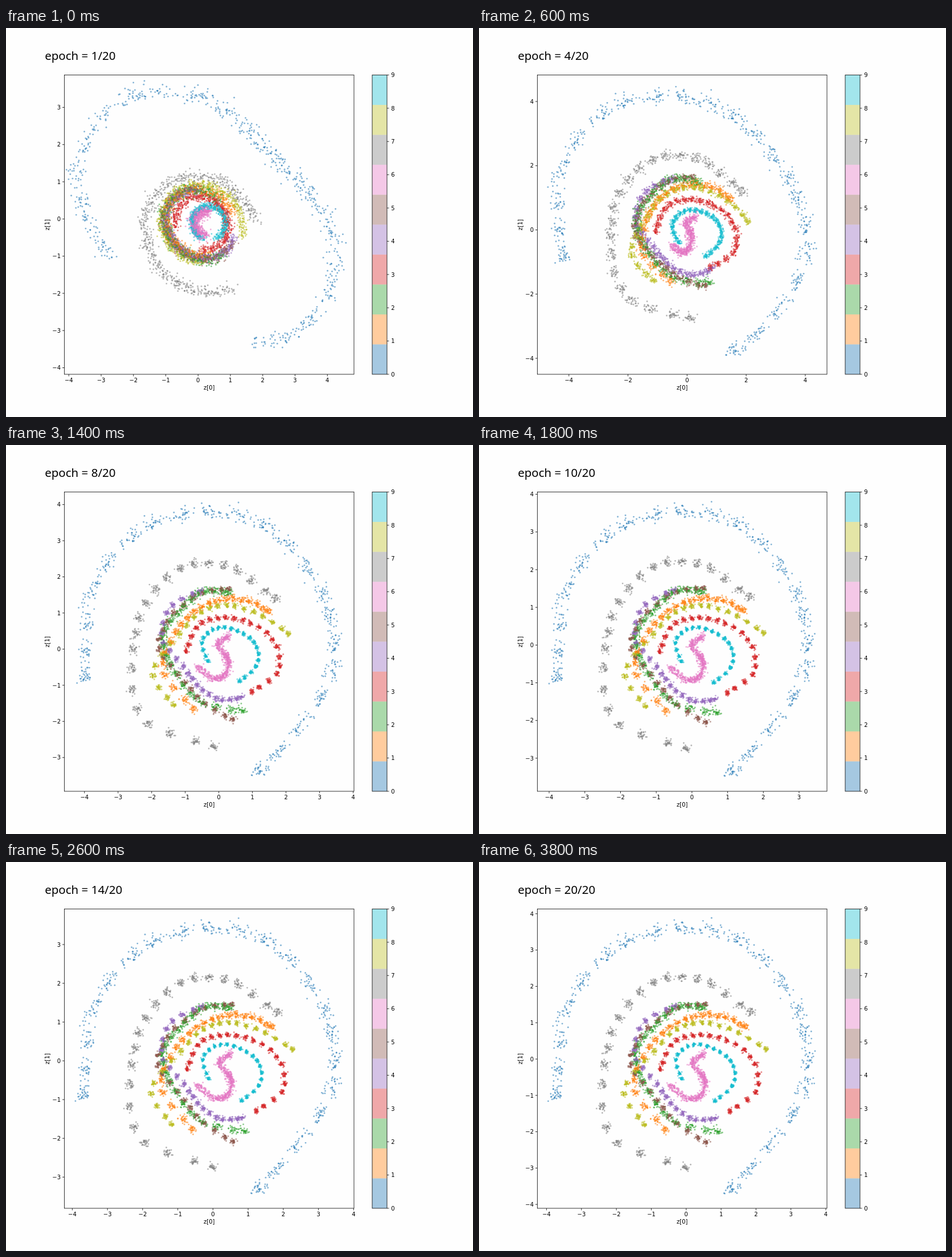
These frames come from a looping animation (820x683 px, 4000 ms). An HTML page with a canvas:

```html
<!DOCTYPE html>
<html lang="en">
<head>
<meta charset="utf-8">
<title>Latent space by epoch</title>
<style>
html, body { margin: 0; width: 100%; height: 100%; overflow: hidden; background: #fefefe; }
canvas { display: block; width: 820px; height: 683px; }
</style>
</head>
<body>
<canvas id="stage" width="820" height="683"></canvas>
<script>
const ctx = document.getElementById('stage').getContext('2d');
const EPOCHS = 20, STEP_MS = 200, CLUSTERS = 21, PER_CLUSTER = 32;
const BOX = { l: 102.5, t: 82.5, r: 611, b: 608 };

// epoch, x of zero, px per x unit, y of zero, px per y unit
const AXES = [
  [1, 337.3, 56.75, 335.3, 65.3],
  [3, 361.3, 50.2, 349, 54.2],
  [6, 373.5, 55.25, 365.5, 60.7],
  [10, 373.9, 62.7, 351.3, 66.2],
  [14, 363.4, 61.75, 349.1, 68.05],
  [17, 362.3, 62.7, 346.4, 66],
  [20, 363.8, 61.3, 346, 63.8]
];

let seed = 20;
function rand() {
  seed = (seed + 0x6D2B79F5) | 0;
  let t = Math.imul(seed ^ (seed >>> 15), 1 | seed);
  t = (t + Math.imul(t ^ (t >>> 7), 61 | t)) ^ t;
  return ((t ^ (t >>> 14)) >>> 0) / 4294967296;
}
const gauss = () => Math.sqrt(-2 * Math.log(1 - rand())) * Math.cos(2 * Math.PI * rand());
const lerp = (a, b, k) => a + (b - a) * k;

// Arc around (cx, cy) in degrees, stretched along the falling diagonal
const arc = (cx, cy, r0, r1, a0, a1, stretch = 0) => t => {
  const a = lerp(a0, a1, t) * Math.PI / 180;
  const r = lerp(r0, r1, t) * (1 - stretch * Math.sin(2 * a));
  return [cx + r * Math.cos(a), cy - r * Math.sin(a)];
};

// Catmull-Rom curve through evenly timed points
const curve = (...p) => t => {
  const last = p.length / 2 - 1, s = t * last;
  const i = Math.max(0, Math.min(last - 1, Math.floor(s))), f = s - i;
  return [0, 1].map(axis => {
    const at = n => p[2 * Math.max(0, Math.min(last, n)) + axis];
    const a = at(i - 1), b = at(i), c = at(i + 1), d = at(i + 2);
    return b + 0.5 * f * (c - a + f * (2 * a - 5 * b + 4 * c - d + f * (3 * (b - c) + d - a)));
  });
};

// Each digit is a chain of clusters that moves from an arc to its final curve.
const digits = [];
function digit(color, sigma, blend, from, to) {
  const dots = Array.from({ length: CLUSTERS * PER_CLUSTER }, (_, n) =>
    ({ cluster: n % CLUSTERS, along: rand() - 0.5, dx: gauss(), dy: gauss() }));
  digits.push({ color, sigma, blend, from, to, dots });
}

digit('#1f77b4', 6.5, 0.65, arc(362, 340, 220, 195, 193, -65, 0.24),
  curve(135, 408, 163, 238, 290, 126, 458, 137, 565, 275, 560, 425, 445, 572));
digit('#ff7f0e', 3, 0.35, arc(340, 345, 64, 54, 24, 283, 0.05),
  curve(468, 289, 428, 271, 382, 270, 335, 291, 296, 330, 272, 397, 326, 469));
digit('#2ca02c', 3.2, 0.6, arc(340, 345, 60, 62, 58, 303, 0.08),
  curve(393, 255, 348, 255, 308, 288, 275, 336, 292, 392, 338, 453, 420, 474));
digit('#d62728', 2.2, 0.1, arc(345, 344, 46, 48, -85, 180, 0.05),
  curve(441, 438, 489, 400, 481, 346, 436, 313, 385, 304, 340, 318, 318, 364));
digit('#9467bd', 2.4, 0.1, arc(340, 345, 58, 60, 100, 335, 0.08),
  curve(343, 254, 288, 283, 275, 341, 313, 390, 340, 427, 377, 452, 415, 450));
digit('#8c564b', 2.6, 0.1, arc(340, 345, 61, 60, 95, 325, 0.08),
  curve(397, 250, 344, 258, 289, 302, 266, 356, 305, 408, 342, 455, 398, 492));
digit('#e377c2', 3, 0.8, arc(352, 342, 20, 22, 80, 260),
  curve(395, 337, 375, 352, 390, 372, 397, 388, 388, 412, 365, 415, 337, 393));
digit('#7f7f7f', 3.9, 0.1, arc(345, 360, 98, 104, 20, 291, 0.06),
  curve(477, 263, 398, 210, 314, 207, 245, 273, 219, 367, 234, 485, 362, 536));
digit('#bcbd22', 2.2, 0.1, arc(342, 345, 74, 66, -10, 262, 0.03),
  curve(504, 328, 450, 297, 396, 282, 348, 293, 303, 338, 254, 401, 290, 461));
digit('#17becf', 1.5, 0.1, arc(355, 342, 31, 28, -55, 245),
  curve(415, 420, 447, 390, 444, 352, 412, 328, 374, 321, 346, 344, 356, 380));

function axesAt(epoch) {
  const i = Math.max(1, AXES.findIndex(a => a[0] >= epoch));
  const a = AXES[i - 1], b = AXES[i], k = (epoch - a[0]) / (b[0] - a[0]);
  const [, x0, sx, y0, sy] = a.map((v, j) => lerp(v, b[j], k));
  return { x0, sx, y0, sy };
}

function drawDots(epoch) {
  const early = Math.exp(-(epoch - 1) / 3);
  ctx.globalAlpha = 0.55;
  for (let n = 0; n < CLUSTERS * PER_CLUSTER; n++) {
    for (const g of digits) {
      const p = g.dots[n];
      const t = (p.cluster + p.along * Math.max(g.blend, 1.2 * early)) / (CLUSTERS - 1);
      const [x1, y1] = g.from(t), [x2, y2] = g.to(t);
      const sigma = g.sigma + 1.8 * early;
      ctx.fillStyle = g.color;
      ctx.beginPath();
      ctx.arc(lerp(x2, x1, early) + p.dx * sigma, lerp(y2, y1, early) + p.dy * sigma, 1.45, 0, 7);
      ctx.fill();
    }
  }
  ctx.globalAlpha = 1;
}

function line(x1, y1, x2, y2) {
  ctx.beginPath();
  ctx.moveTo(x1, y1);
  ctx.lineTo(x2, y2);
  ctx.stroke();
}

function label(text, x, y, align) {
  ctx.textAlign = align;
  ctx.fillText(text, x, y);
}

const signed = v => (v < 0 ? '\u2212' : '') + Math.abs(v);

function ticks(lo, hi, draw) {
  const step = hi - lo > 9 ? 2 : 1;
  for (let v = Math.ceil(lo / step) * step; v <= hi; v += step) draw(v);
}

function drawFrame(epoch) {
  const { x0, sx, y0, sy } = axesAt(epoch);
  ctx.strokeStyle = ctx.fillStyle = '#000';
  ctx.lineWidth = 0.8;
  ctx.font = '10px "DejaVu Sans", sans-serif';
  ctx.strokeRect(BOX.l, BOX.t, BOX.r - BOX.l, BOX.b - BOX.t);
  ticks((BOX.l - x0) / sx, (BOX.r - x0) / sx, v => {
    const x = x0 + v * sx;
    line(x, BOX.b, x, BOX.b + 3.5);
    label(signed(v), x, 622, 'center');
  });
  ticks((y0 - BOX.b) / sy, (y0 - BOX.t) / sy, v => {
    const y = y0 - v * sy;
    line(BOX.l - 3.5, y, BOX.l, y);
    label(signed(v), 96, y + 3.7, 'right');
  });
  label('z[0]', 356.7, 635, 'center');
  ctx.save();
  ctx.translate(76, 345.5);
  ctx.rotate(-Math.PI / 2);
  label('z[1]', 0, 0, 'center');
  ctx.restore();
}

function drawColorbar() {
  const x = 643, w = 26, h = BOX.b - BOX.t, band = h / 10;
  ctx.globalAlpha = 0.4;
  digits.forEach((d, i) => {
    ctx.fillStyle = d.color;
    ctx.fillRect(x, BOX.b - (i + 1) * band, w, band);
  });
  ctx.globalAlpha = 1;
  ctx.fillStyle = '#000';
  ctx.strokeRect(x, BOX.t, w, h);
  for (let v = 0; v < 10; v++) {
    const y = BOX.b - v * h / 9;
    line(x + w, y, x + w + 3.5, y);
    label(v, 676.3, y + 3.7, 'left');
  }
}

function draw(epoch) {
  ctx.fillStyle = '#fefefe';
  ctx.fillRect(0, 0, 820, 683);
  drawDots(epoch);
  drawFrame(epoch);
  drawColorbar();
  ctx.font = '20.5px "Noto Sans", "Open Sans", sans-serif';
  label(`epoch = ${epoch}/${EPOCHS}`, 68.2, 56, 'left');
}

let shown = 0;
const start = performance.now();
function tick() {
  const epoch = 1 + Math.floor(Math.max(0, performance.now() - start) / STEP_MS) % EPOCHS;
  if (epoch !== shown) draw(shown = epoch);
  requestAnimationFrame(tick);
}
tick();
</script>
</body>
</html>
```
